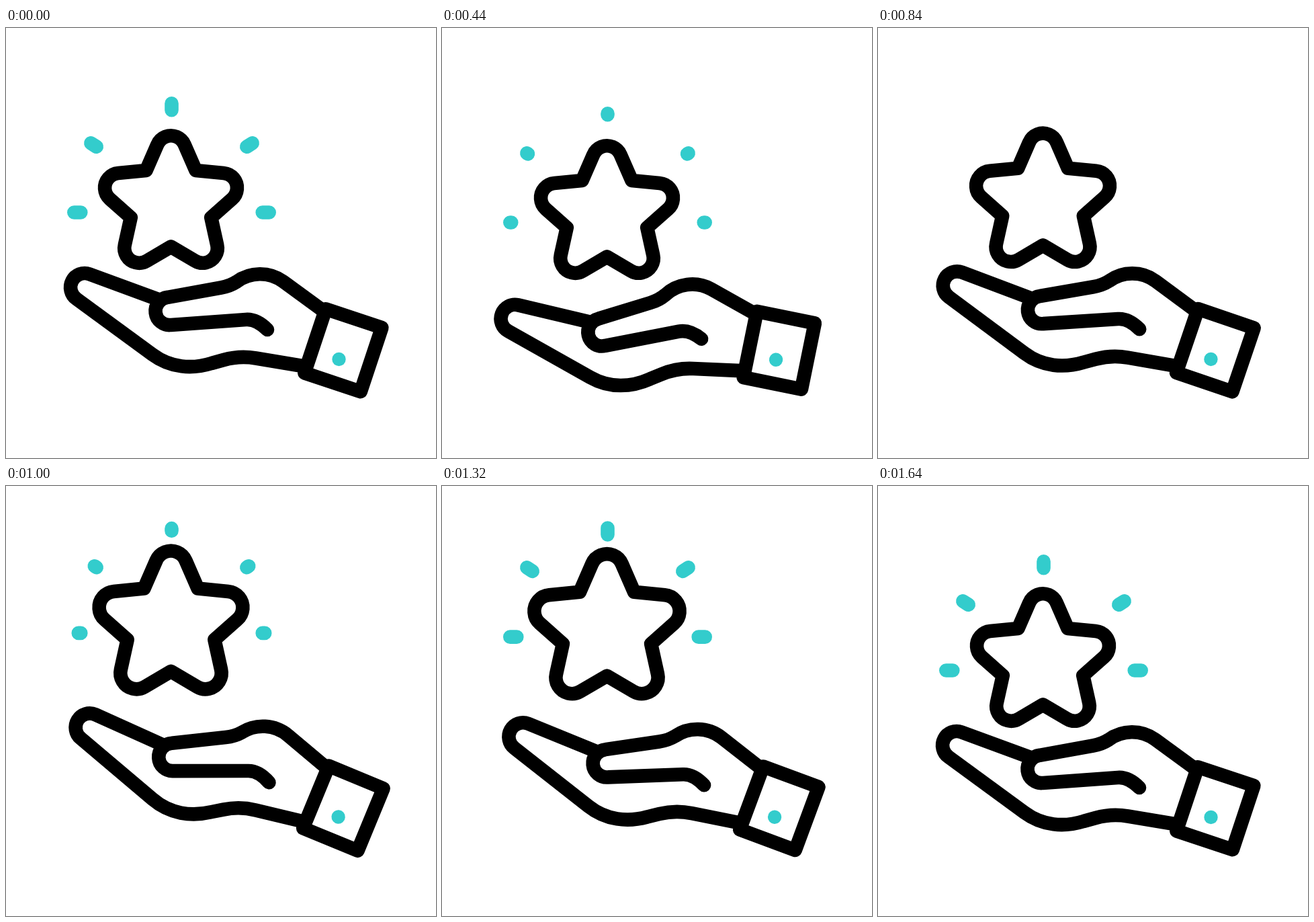
An HTML page with a canvas for the animation above (2 s loop, 640 px wide and 640 px high).

```html
<!DOCTYPE html>
<html lang="en">
<head>
<meta charset="utf-8">
<title>Star in hand</title>
<style>
  html, body { margin: 0; width: 100%; height: 100%; overflow: hidden; background: #fff; }
  canvas { display: block; width: 640px; height: 640px; }
</style>
</head>
<body>
<canvas id="stage" width="640" height="640"></canvas>
<script>
const ctx = document.getElementById('stage').getContext('2d');
const LOOP = 2000, STEP = 40, LINE = 20.6;
const INK = '#000', TEAL = '#33cccc';
const rad = deg => deg * Math.PI / 180;

const WRIST = { x: 502, y: 480.2 };
const PALM = new Path2D(
  'M441 503 L372 491.5 C355 488.5 340 489.5 324 494 L306 499 C277 508 245 506 218 486 ' +
  'L105 403.2 A21 21 0 0 1 124.3 366.3 L228 404.5');
const THUMB = new Path2D(
  'M389 449 C380 440 370 433 357 434 L245.8 441.9 A20.7 20.7 0 0 1 240.6 400.8 ' +
  'L320 386.5 Q333 384.3 343.5 377.5 C363 363 391.5 362 412.5 377.3 L471 420');

// Smooth progress from 0 to 1 between two times.
function ease(time, start, end) {
  const u = Math.min(1, Math.max(0, (time - start) / (end - start)));
  return u * u * (3 - 2 * u);
}

function drawHand(turn) {
  ctx.save();
  ctx.translate(WRIST.x, WRIST.y);
  ctx.rotate(rad(turn));

  ctx.save();
  ctx.translate(-WRIST.x, -WRIST.y);
  ctx.stroke(PALM);
  ctx.stroke(THUMB);
  ctx.restore();

  ctx.fillStyle = TEAL;
  ctx.beginPath();
  ctx.arc(-6.5, 12.8, 10.2, 0, 2 * Math.PI);
  ctx.fill();

  ctx.rotate(rad(18.4));
  ctx.strokeRect(-44.3, -50.5, 88, 100.2);
  ctx.restore();
}

// Five rounded tips joined through sharp notches; the line keeps its width at any scale.
function drawStar(shift, scale) {
  const tipDistance = 80.4, notchDistance = 62.8, tipRadius = 22, tipSpread = rad(67);
  ctx.save();
  ctx.translate(245.5, 255 + shift);
  ctx.scale(scale, scale);
  ctx.translate(0, 7.7);
  ctx.beginPath();
  for (let i = 0; i < 5; i++) {
    const tip = rad(72 * i - 90), notch = tip + rad(36);
    ctx.arc(tipDistance * Math.cos(tip), tipDistance * Math.sin(tip), tipRadius,
      tip - tipSpread, tip + tipSpread);
    ctx.lineTo(notchDistance * Math.cos(notch), notchDistance * Math.sin(notch));
  }
  ctx.closePath();
  ctx.restore();
  ctx.stroke();
}

// Rays are mirrored about the star; from and to are fractions from outer to inner end.
function drawRays(shift, from, to) {
  if (to - from < 0.001) return;
  const length = 10;
  const addRay = (side, x, y, angle) => {
    const along = f => [side * (x - f * length * Math.cos(angle)), y + f * length * Math.sin(angle)];
    ctx.moveTo(...along(from));
    ctx.lineTo(...along(to));
  };
  ctx.save();
  ctx.translate(246.5, shift);
  ctx.strokeStyle = TEAL;
  ctx.beginPath();
  addRay(1, 0, 112.3, rad(90));
  for (const side of [-1, 1]) {
    addRay(side, 120.2, 171.3, rad(33));
    addRay(side, 145.2, 274.5, 0);
  }
  ctx.stroke();
  ctx.restore();
}

function draw(time) {
  const during = (start, end) => ease(time, start, end);
  const turn = -8 * during(50, 560) + 12 * during(560, 1000) - 4 * during(1000, 1620);
  const shift = 30 * during(200, 680) - 91 * during(695, 1053) + 61 * during(1200, 1640);
  const scale = 1 + 0.12 * (during(780, 1120) - during(1200, 1640));

  ctx.fillStyle = '#fff';
  ctx.fillRect(0, 0, 640, 640);
  ctx.lineWidth = LINE;
  ctx.lineCap = ctx.lineJoin = 'round';
  ctx.strokeStyle = INK;

  drawHand(turn);
  drawStar(shift, scale);
  if (time < 700) drawRays(shift, 0, 1 - during(150, 555));
  else drawRays(shift, 1 - during(880, 1180), 1);
}

const start = performance.now();
function tick() {
  const time = (performance.now() - start) % LOOP;
  draw(Math.floor(time / STEP) * STEP);
  requestAnimationFrame(tick);
}
tick();
</script>
</body>
</html>
```
